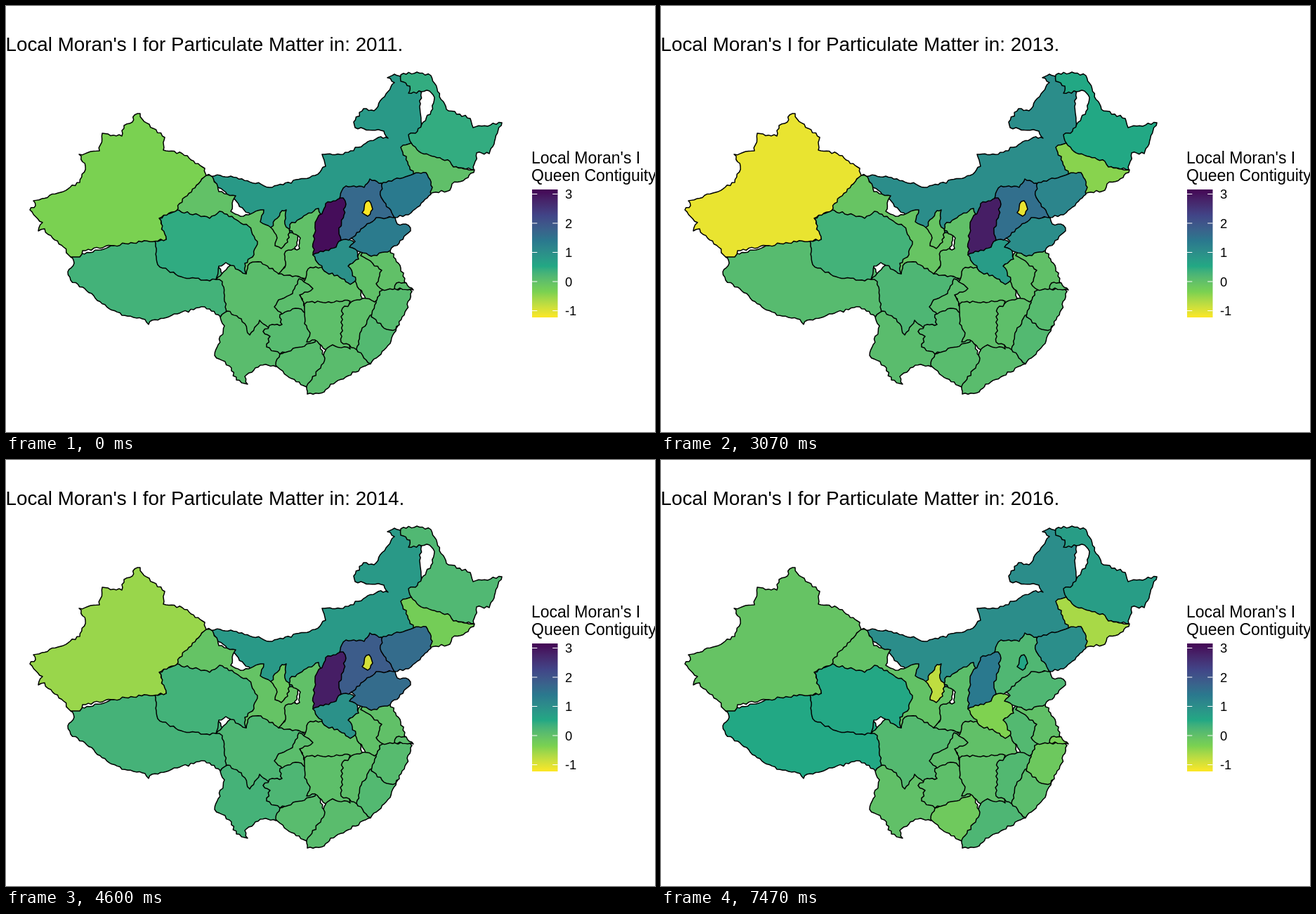
Recreate the animation shown at these times as an HTML page with a canvas. Size 924 by 606 pixels, loop 8000 ms.

```html
<!DOCTYPE html>
<html lang="en">
<head>
<meta charset="utf-8">
<title>Local Moran's I</title>
<style>
html, body { margin: 0; width: 100%; height: 100%; overflow: hidden; background: #fff; }
canvas { display: block; }
</style>
</head>
<body>
<canvas id="map" width="924" height="606"></canvas>
<script>
const ctx = document.getElementById('map').getContext('2d');
const LOOP = 8000;
const FILL_TIMES = [0, 1470, 3000, 4530, 6000, 7400];
const YEAR_TIMES = [0, 1530, 3070, 4600, 6070, 7470];
const FONT = '"Liberation Sans", Arial, sans-serif';
const TOP_VALUE = 3.15, VALUE_SPAN = 4.4;
const STOPS = ['440154', '414487', '2a788e', '22a884', '7ad151', 'fde725'];

const shapes = [];

// Key corners only; the ragged borders between them are generated.
// Later regions cover the edges of earlier ones.
// Levels: one per year, or [all earlier years, last year].
function region(corners, ...levels) {
  shapes.push({
    path: raggedPath(corners, 1009 * (shapes.length + 3)),
    fills: FILL_TIMES.map((_, year) => scaleColor(
      levels.length > 2 ? levels[year] : levels[year < 5 ? 0 : 1]))
  });
}

function seeded(seed) {
  return () => {
    seed = (seed * 16807) % 2147483647;
    return seed / 2147483647;
  };
}

function raggedPath(text, seed) {
  const pts = text.split(' ').map(p => p.split(',').map(Number));
  const rand = seeded(seed);
  const path = new Path2D();
  pts.forEach(([x, y], i) => {
    const [nx, ny] = pts[(i + 1) % pts.length];
    const len = Math.hypot(nx - x, ny - y);
    const steps = Math.max(1, Math.round(len / 4));
    path.lineTo(x, y);
    for (let k = 1; k < steps; k++) {
      const t = k / steps, d = (rand() - 0.5) * 3.4;
      path.lineTo(x + (nx - x) * t - (ny - y) / len * d,
                  y + (ny - y) * t + (nx - x) / len * d);
    }
  });
  path.closePath();
  return path;
}

function toLab(hex) {
  const [r, g, b] = [0, 2, 4].map(i => {
    const c = parseInt(hex.slice(i, i + 2), 16) / 255;
    return c > 0.04045 ? ((c + 0.055) / 1.055) ** 2.4 : c / 12.92;
  });
  const f = t => t > 0.008856 ? Math.cbrt(t) : 7.787 * t + 16 / 116;
  const x = f((0.4124 * r + 0.3576 * g + 0.1805 * b) / 0.9505);
  const y = f(0.2126 * r + 0.7152 * g + 0.0722 * b);
  const z = f((0.0193 * r + 0.1192 * g + 0.9505 * b) / 1.089);
  return [116 * y - 16, 500 * (x - y), 200 * (y - z)];
}

function toRgb([l, a, b]) {
  const fy = (l + 16) / 116;
  const g = t => t > 0.2069 ? t ** 3 : (t - 16 / 116) / 7.787;
  const x = 0.9505 * g(fy + a / 500), y = g(fy), z = 1.089 * g(fy - b / 200);
  const out = [
    3.2406 * x - 1.5372 * y - 0.4986 * z,
    -0.9689 * x + 1.8758 * y + 0.0415 * z,
    0.0557 * x - 0.204 * y + 1.057 * z
  ].map(c => {
    c = Math.min(1, Math.max(0, c));
    return Math.round(255 * (c > 0.0031308 ? 1.055 * c ** (1 / 2.4) - 0.055 : 12.92 * c));
  });
  return `rgb(${out})`;
}

const LAB = STOPS.map(toLab);

function scaleColor(value) {
  const t = Math.min(5, Math.max(0, (TOP_VALUE - value) / VALUE_SPAN * 5));
  const i = Math.min(4, Math.floor(t));
  return toRgb(LAB[i].map((c, k) => c + (LAB[i + 1][k] - c) * (t - i)));
}

// Tibet
region('92,357 97,366 88,378 92,390 122,409 130,419 165,440 198,446 203,453 208,447 236,440 283,428 305,442 325,430 300,360 212,325', 0.3, 0.1, 0.1, 0.28, 0.35, 0.51);
// Inner Mongolia
region('285,241 320,242 379,258 440,241 455,228 450,211 480,211 530,187 544,188 538,178 497,173 495,165 509,146 524,149 541,125 553,109 543,102 553,97 590,115 590,235 500,290 385,330', 0.78, 0.98, 1, 0.78, 0.68, 1);
// Heilongjiang
region('562,98 585,94 605,99 627,147 661,160 665,173 706,166 693,200 688,210 670,209 666,233 600,225 577,195 573,183 583,181 605,150 610,130 603,121 573,124 575,114 562,107', 0.42, 0.47, 0.51, 0.17, 0.1, 0.7);
// Jilin
region('562,201 577,195 588,207 632,221 637,229 667,233 658,244 635,253 632,262 604,267 580,239', 0, -0.6, -0.45, -0.28, -0.2, -0.65);
// Liaoning
region('532,263 537,251 580,239 598,237 607,258 605,268 586,286 573,297 553,301 520,280', 1.35, 1.4, 1.15, 1.6, 1.6, 0.98);
// Sichuan
region('299,389 308,392 315,440 347,480 410,450 430,390 340,350', 0.05, 0.2, 0.2, 0.2, 0.13, 0.13);
// Gansu
region('285,241 294,243 303,264 327,270 320,292 338,299 367,290 362,307 377,315 416,325 410,355 388,381 363,364 347,366 342,381 235,285', -0.03, -0.1, -0.1, -0.07, -0.05, -0.05);
// Yunnan
region('305,443 315,434 335,445 347,468 361,447 400,480 388,512 362,511 340,527 344,538 328,532 318,512 297,497 311,455', 0.07, 0.07, 0.07, 0.28, 0.28, -0.02);
// Shaanxi
region('404,311 418,303 445,288 455,365 440,390 388,381 397,372 398,349 418,345 419,330 403,319', -0.02, 0.04);
// Hubei
region('430,374 441,371 500,380 510,435 425,424 418,410', -0.02, -0.02);
// Chongqing
region('417,388 437,402 418,411 431,440 400,445 382,428 388,418 408,409', 0.06, 0.03);
// Guangxi
region('384,511 390,495 440,465 462,520 430,544 400,526', 0.08, -0.2);
// Guizhou
region('366,463 379,453 393,453 390,439 412,430 440,440 440,478 390,495 371,485 376,470', 0.1, 0.12, 0.12, 0.2, 0.2, 0.02);
// Guangdong
region('455,490 465,470 515,475 519,509 462,538 453,549 429,552 428,541 452,508', 0.07, 0.2);
// Hunan
region('425,424 432,421 490,420 490,488 465,482 455,489 440,475 428,478 433,465 425,452', 0.02, 0.01);
// Jiangxi
region('479,430 500,418 535,410 530,455 499,489 477,478', 0.02, 0.15);
// Fujian
region('516,444 525,435 558,455 547,480 519,509 499,488 506,462', 0.14, 0.06);
// Zhejiang
region('527,422 535,395 560,393 578,406 570,432 555,460 542,460 520,442', 0.1, -0.18);
// Anhui
region('502,353 515,345 550,375 525,421 512,416 499,395 485,375', -0.01, 0.14);
// Jiangsu
region('505,355 520,340 547,347 562,373 570,395 566,403 535,403 527,395 535,376 522,366', -0.02, -0.02);
// Shanghai
region('556,394 570,394 580,404 553,402', 0.06, -0.32);
// Henan
region('437,354 480,325 500,340 502,360 487,370 498,390 490,396 475,386 453,377', 0.95, 0.68, 0.72, 0.92, 1.05, -0.4);
// Shandong
region('515,300 554,301 557,310 573,312 576,320 547,348 520,356 489,343 497,335 485,328', 1.33, 1, 1, 1.6, 1.6, 0.18);
// Hebei
region('478,263 484,256 510,258 518,246 535,252 534,272 553,301 527,301 488,333 475,334 465,300', 1.65, 1.65, 1.55, 1.87, 1.9, 0.18);
// Shanxi
region('480,273 484,282 474,320 477,333 470,343 437,354 440,312 455,281', 3.05, 2.98, 2.85, 2.85, 3.15, 1.38);
// Qinghai
region('242,290 218,302 228,332 212,334 216,368 245,384 290,391 299,389 303,370 313,365 342,381 340,366 351,357 358,335 345,313 304,292 290,302', 0.44, 0.3, 0.3, 0.3, 0.27, 0.53);
// Xinjiang
region('183,155 191,153 194,161 226,187 224,205 251,210 283,231 285,241 247,281 243,291 218,302 228,332 170,338 109,348 105,357 92,357 82,343 60,325 55,317 46,320 52,308 34,290 42,284 39,277 78,265 105,251 113,228 104,211 133,206 137,181 165,185 168,170 180,165', -0.37, -0.98, -1.1, -0.55, -0.22, -0.08);
// Ningxia
region('399,290 393,291 377,315 386,330 383,341 392,345 401,336 404,322 397,310', -0.05, -0.1, -0.1, -0.15, -0.15, -0.8);
// Beijing
region('513,278 517,277 522,289 515,299 507,294', -1.25, -0.98, -1.1, -0.95, -0.95, 0.55);

const bar = { x: 749, y: 261, w: 36.5, h: 182 };
const barFill = ctx.createLinearGradient(0, bar.y, 0, bar.y + bar.h);
for (let i = 0; i <= 40; i++) {
  barFill.addColorStop(i / 40, scaleColor(TOP_VALUE - VALUE_SPAN * i / 40));
}

function label(text, x, y, size) {
  ctx.font = `${size}px ${FONT}`;
  ctx.fillStyle = '#000';
  ctx.fillText(text, x, y);
}

function drawLegend() {
  label("Local Moran's I", 748, 223.5, 23);
  label('Queen Contiguity', 748, 248.5, 23);
  ctx.fillStyle = barFill;
  ctx.fillRect(bar.x, bar.y, bar.w, bar.h);
  for (let v = 3; v >= -1; v--) {
    const y = 267.5 + (3 - v) * 41.5;
    ctx.fillStyle = '#fff';
    ctx.fillRect(bar.x, y - 0.5, 7.3, 1);
    ctx.fillRect(bar.x + bar.w - 7.3, y - 0.5, 7.3, 1);
    label(String(v), 796, y + 6.5, 18.4);
  }
}

const stepAt = (times, t) => times.filter(s => s <= t).length - 1;

function draw(t) {
  const state = stepAt(FILL_TIMES, t);
  ctx.fillStyle = '#fff';
  ctx.fillRect(0, 0, 924, 606);
  ctx.lineWidth = 1.5;
  ctx.lineJoin = 'round';
  ctx.strokeStyle = '#000';
  for (const { path, fills } of shapes) {
    ctx.fillStyle = fills[state];
    ctx.fill(path);
    ctx.stroke(path);
  }
  const year = 2011 + stepAt(YEAR_TIMES, t);
  label(`Local Moran's I for Particulate Matter in: ${year}.`, -0.5, 64, 27.8);
  drawLegend();
}

const start = performance.now();
function tick() {
  draw((performance.now() - start) % LOOP);
  requestAnimationFrame(tick);
}
tick();
</script>
</body>
</html>
```
